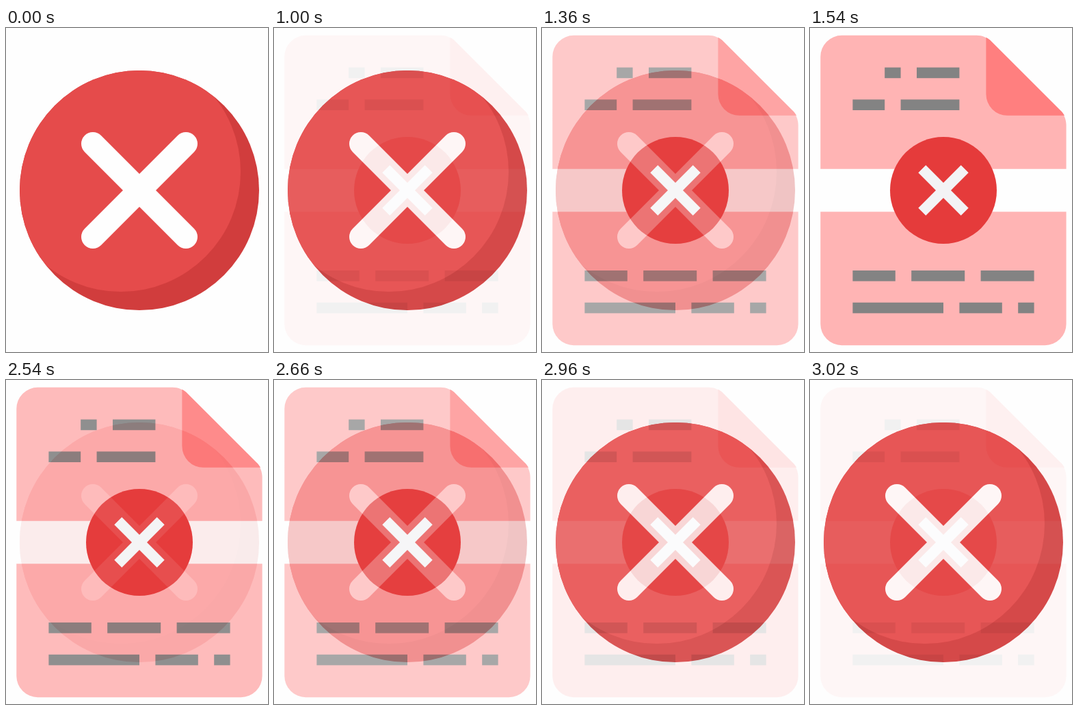
An HTML page with a canvas that plays this animation: 383 px wide and 473 px high, repeating every 3080 ms.

```html
<!DOCTYPE html>
<html lang="en">
<head>
<meta charset="utf-8">
<title>Cancel badge to deleted document</title>
<style>
html, body { margin: 0; width: 100%; height: 100%; overflow: hidden; background: #fefefe; }
canvas { display: block; }
</style>
</head>
<body>
<canvas id="stage" width="383" height="473"></canvas>
<script>
const W = 383, H = 473, CX = 195, CY = 237, U = 7.8;
const LOOP = 3080, HOLD = 1000, STEP = 60;
const ctx = document.getElementById('stage').getContext('2d');

function layer(draw) {
  const c = document.createElement('canvas');
  c.width = W;
  c.height = H;
  const g = c.getContext('2d');
  g.fillStyle = '#fefefe';
  g.fillRect(0, 0, W, H);
  draw(g);
  return c;
}

function disc(g, x, y, r, color) {
  g.fillStyle = color;
  g.beginPath();
  g.arc(x, y, r, 0, 7);
  g.fill();
}

function cross(g, d, width, cap, color) {
  g.strokeStyle = color;
  g.lineWidth = width;
  g.lineCap = cap;
  g.beginPath();
  g.moveTo(CX - d, CY - d);
  g.lineTo(CX + d, CY + d);
  g.moveTo(CX + d, CY - d);
  g.lineTo(CX - d, CY + d);
  g.stroke();
}

const badge = layer(g => {
  disc(g, CX, CY, 175, '#d13d3d');
  g.save();
  g.beginPath();
  g.arc(CX, CY, 175, 0, 7);
  g.clip();
  disc(g, CX - 27, CY - 27, 175, '#e54b4b');
  g.restore();
  cross(g, 68, 34, 'round', '#fefefe');
});

// Text lines: row offset from the centre, then [start, end] pairs, in units.
const lines = [
  [-23, [14, 17], [20, 28]],
  [-17, [8, 14], [17, 28]],
  [15, [8, 16], [19, 29], [32, 42]],
  [21, [8, 25], [28, 36], [39, 42]]
];

const page = layer(g => {
  g.fillStyle = '#ffb4b4';
  g.fill(new Path2D('M15.3 205.8V42a31.2 31.2 0 0 1 31.2-31.2H243.4' +
    'c8.3 0 16.2 3.3 22.1 9.1L365.5 119.7c5.8 5.9 9.1 13.8 9.1 22.1V205.8Z'));
  g.fill(new Path2D('M15.3 268.2H374.6V432a31.2 31.2 0 0 1-31.2 31.2H46.5' +
    'a31.2 31.2 0 0 1-31.2-31.2Z'));
  g.fillStyle = '#ff7f7f';
  g.fill(new Path2D('M257.4 13.8c3 1.5 5.7 3.6 8.1 6.1L365.5 119.7' +
    'c2.7 2.4 4.9 5.1 6.6 8.1H288.6a31.2 31.2 0 0 1-31.2-31.2Z'));
  g.fillStyle = '#838383';
  for (const [row, ...bars] of lines)
    for (const [a, b] of bars)
      g.fillRect(a * U, CY + row * U, (b - a) * U, 2 * U);
  disc(g, CX, CY, 10 * U, '#e53b3b');
  cross(g, 4 * U, 2 * U, 'butt', '#f3f3f5');
});

// Opacity of the page: ten even steps in, a hold, nine steps back out.
function pageAlpha(t) {
  const half = LOOP / 2;
  const into = t % half;
  const k = into < HOLD ? 0 : Math.floor((into - HOLD) / STEP) + 1;
  return (t < half ? k : 10 - k) / 10;
}

function frame(now) {
  ctx.globalAlpha = 1;
  ctx.drawImage(badge, 0, 0);
  ctx.globalAlpha = pageAlpha(now % LOOP);
  ctx.drawImage(page, 0, 0);
  requestAnimationFrame(frame);
}

frame(0);
</script>
</body>
</html>
```
